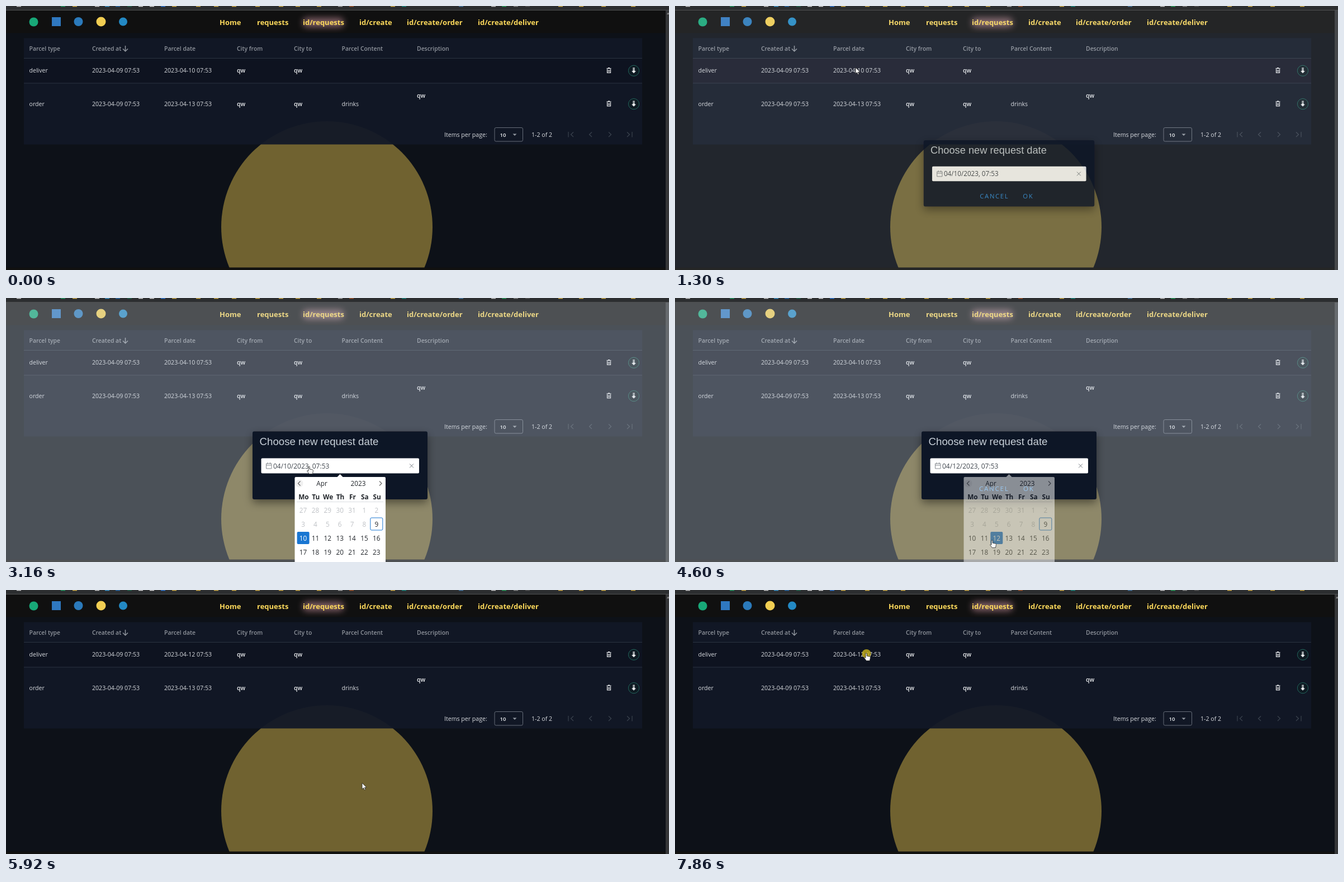
An HTML page that plays this animation: 1186 px wide and 472 px high, repeating every 7990 ms.

```html
<!DOCTYPE html>
<html lang="en">
<head>
<meta charset="utf-8">
<title>Parcel requests</title>
<style>
  html, body { margin: 0; width: 100%; height: 100%; overflow: hidden; background: #0d1117; }
  svg { display: block; width: 100%; height: 100%; }
  text { font: 500 10.6px "Open Sans", "Noto Sans", sans-serif; fill: #d8dbdf; white-space: pre; }
  .nav { font-size: 13px; font-weight: 700; fill: #fcd95b; }
  .head { font-size: 10.4px; font-weight: 600; fill: #90959d; }
  .strong { font-weight: 600; fill: #eceef0; }
  .title { font: 18.7px "Liberation Sans", Arial, sans-serif; fill: #c9d1d9; }
  .field { font-size: 12px; font-weight: 400; fill: #40474f; }
  .button { font-size: 11.6px; letter-spacing: 1.7px; fill: #2d8fe2; }
  .day { font-size: 11.8px; font-weight: 400; fill: #23272c; text-anchor: middle; }
  .past { fill: #bfc2c6; }
  .week { font-weight: 700; }
  .picked { fill: #fff; }
  .line { fill: none; stroke-width: 1.2; }
</style>
</head>
<body>
<svg id="stage" viewBox="0 0 1186 472" preserveAspectRatio="none"></svg>
<script>
const LOOP = 7990;
const OPEN = 1170, CLOSE = 5700, CLOSED = 5880;
const PICK = 4470, SAVE = 5640;

const text = (x, y, str, cls = '', id = '') =>
  `<text x="${x}" y="${y}" class="${cls}" id="${id}">${str}</text>`;
const rect = (x, y, w, h, fill, more = '') =>
  `<rect x="${x}" y="${y}" width="${w}" height="${h}" fill="${fill}" ${more}/>`;
const circle = (x, y, r, fill, more = '') =>
  `<circle cx="${x}" cy="${y}" r="${r}" fill="${fill}" ${more}/>`;
const line = (d, stroke, more = '') =>
  `<path class="line" d="${d}" stroke="${stroke}" ${more}/>`;

function browserEdge() {
  const folders = [123, 301, 344, 376, 408, 450, 492, 522, 560, 692, 992, 1029, 1069, 1122];
  const others = [[23, '#ccc'], [102, '#1f9d61'], [163, '#ccc'], [181, '#3a9bd8'], [200, '#246bb0'],
    [221, '#20684e'], [241, '#ddd'], [261, '#ddd'], [281, '#2f7be0'], [598, '#aaa'], [618, '#a9562a'],
    [712, '#168a80'], [814, '#467aa8'], [872, '#ccc'], [891, '#25a45b'], [912, '#888'], [933, '#555']];
  return rect(0, 0, 1186, 8, '#2c2e30') + rect(0, 7, 1186, 1, '#505152') +
    folders.map(x => rect(x - 4, 0, 8, 1.3, '#d9b348')).join('') +
    others.map(([x, c]) => rect(x - 4, 0, 8, 1.3, c)).join('');
}

function navbar() {
  const links = [[382, 'Home'], [449, 'requests'], [531, 'id/requests'], [632, 'id/create'],
    [717, 'id/create/order'], [844, 'id/create/deliver']];
  return rect(0, 8, 1180, 40.5, '#101010') +
    '<g clip-path="url(#bar)">' +
    rect(531, 21, 73, 17, '#e6a5b4', 'rx="7" opacity=".5" filter="url(#blur)"') + '</g>' +
    circle(49.5, 28.5, 8, '#18a878') + rect(82, 20, 16, 16, '#2f78c0') +
    circle(129.5, 28, 8, '#2b7abb') + circle(170, 28, 8.5, '#f2ce52') + circle(209.5, 28, 7.5, '#2389c4') +
    links.map(([x, s]) => text(x, 33.6, s, 'nav')).join('');
}

const rowIcons = y =>
  `<g transform="translate(1078.5 ${y})">` +
  line('M-3 -2.6V4H3V-2.6M-4 -3.6H4M-1.5 -4.6H1.5M-1 -1V2.5M1 -1V2.5', '#e4e6e8') + '</g>' +
  `<g transform="translate(1123 ${y})">` +
  circle(0, .4, 9.6, '#0e1a22', 'stroke="#22655c" stroke-width="1"') +
  '<path d="M-1.8 -5H1.8V-3.8H-1.8ZM-1.8 -3H1.8V-1.6H-1.8ZM-1.8 -.8H1.8V1H4L0 5L-4 1H-1.8Z" fill="#e8eaec"/></g>';

function table() {
  const heads = [[41.5, 'Parcel type'], [154, 'Created at'], [283, 'Parcel date'], [413, 'City from'],
    [515, 'City to'], [600.5, 'Parcel Content'], [735, 'Description']];
  const row = (y, kind, date, id) =>
    text(41.5, y, kind) + text(154, y, '2023-04-09 07:53') + text(283, y, date, '', id) +
    text(413, y, 'qw', 'strong') + text(515, y, 'qw', 'strong') + rowIcons(y - 4);
  return rect(32, 57.5, 1106, 190, '#111827', 'opacity=".94"') +
    rect(32, 94, 1106, 44, '#0c121d', 'opacity=".55"') +
    rect(32, 94, 1106, 44, '#8b6f8a', 'id="hover"') +
    rect(32, 93, 1106, 1, '#2a3340') + rect(32, 137.5, 1106, 1, '#2a3340') +
    heads.map(([x, s]) => text(x, 80, s, 'head')).join('') +
    line('M213.5 71V80.5M209 76.5L213.5 81L218 76.5', '#90959d', 'style="stroke-width:1.5"') +
    row(119.3, 'deliver', '', 'date') + row(178.8, 'order', '2023-04-13 07:53') +
    text(600.5, 178.8, 'drinks') + text(735, 163.8, 'qw', 'strong') +
    text(784, 233.6, 'Items per page:') +
    rect(874, 217.5, 50.5, 24.5, 'none', 'rx="2.5" stroke="#666d78"') +
    text(883.5, 233.6, '10', 'strong', 'size') +
    '<path d="M906.5 228.5H913.5L910 232Z" fill="#9298a0"/>' +
    text(940, 233.6, '1-2 of 2') +
    line('M1006 225V234.5M1015 225.5L1010.5 229.7L1015 234M1048 225.5L1043.5 229.7L1048 234' +
      'M1078 225.5L1082.5 229.7L1078 234M1111 225.5L1115.5 229.7L1111 234M1120 225V234.5', '#3a424d');
}

function dialog() {
  return rect(441, 238.5, 313, 121.5, '#111827', 'rx="3" filter="url(#shadow)"') +
    text(453.5, 263.4, 'Choose new request date', 'title') +
    rect(456.5, 286.5, 282.5, 27, '#fff', 'rx="2"') +
    line('M465.5 296H475V305H465.5ZM465.5 299H475M468 294V297M472.5 294V297', '#858a90', 'style="stroke-width:1"') +
    text(478, 304.5, '', 'field', 'value') +
    line('M722 296.5L729 303.5M729 296.5L722 303.5', '#777d84', 'style="stroke-width:1"') +
    rect(608.5, 326.5, 48.5, 27.5, '#2388e0', 'id="okHover" rx="2"') +
    text(544, 344.8, 'CANCEL', 'button') + text(623, 344.8, 'OK', 'button');
}

const cellX = i => 531.6 + 21.87 * i;
const cell = (i, row, more) => rect(cellX(i) - 11, 418 + 25 * row, 22, 22, 'none', 'rx="2" ' + more);

function calendar() {
  let out = '<path d="M591.5 321L597.5 315L603.5 321Z" fill="#fff"/>' +
    rect(516.5, 320, 162.5, 160, '#fff', 'rx="2"') + circle(524.5, 331.5, 7, '#f0f0f0') +
    line('M526.5 327.5L522.5 331.5L526.5 335.5M668 327.5L672 331.5L668 335.5', '#666') +
    text(565, 335.8, 'Apr', 'day') + text(630, 335.8, '2023', 'day') +
    rect(520, 364, 155, 1, '#dcdfe3') +
    cell(6, -1, 'stroke="#1976d2"') + '<rect id="pick" y="418" width="22" height="22" rx="2" fill="#1976d2"/>';
  ['Mo', 'Tu', 'We', 'Th', 'Fr', 'Sa', 'Su'].forEach((d, i) => {
    out += text(cellX(i) + .8, 360, d, 'day week');
  });
  for (let n = 0; n < 28; n++) {
    const day = n < 5 ? 27 + n : n - 4;
    out += text(cellX(n % 7), 383.6 + 25 * Math.floor(n / 7), day, 'day' + (n < 13 ? ' past' : ''), 'd' + n);
  }
  return out;
}

document.getElementById('stage').innerHTML = `
  <defs>
    <clipPath id="bar"><rect y="8" width="1186" height="40"/></clipPath>
    <filter id="blur" x="-40%" y="-150%" width="180%" height="400%">
      <feGaussianBlur stdDeviation="6"/>
    </filter>
    <filter id="shadow" x="-20%" y="-30%" width="140%" height="170%">
      <feDropShadow dx="0" dy="6" stdDeviation="8" flood-opacity=".45"/>
    </filter>
  </defs>
  ${rect(0, 0, 1186, 472, '#0d1118')}
  ${circle(574, 395, 189, '#706230')}
  ${rect(0, 467.5, 1180, 5, '#111110')}
  ${navbar()}${table()}
  ${rect(1180, 8, 6, 464, '#353638')}
  <path id="scrollArrow" d="M1182 15L1184.5 11.5L1187 15Z" fill="#8a8a8a"/>
  ${rect(0, 8, 1186, 464, '#cdd7e0', 'id="scrim"')}
  ${browserEdge()}
  <g id="dialog">${dialog()}</g>
  <g id="calendar">${calendar()}</g>
  ${circle(0, 0, 8, '#c9b41a', 'id="press" opacity=".8"')}
  <g id="cursor" stroke="#222" stroke-width=".8" stroke-linejoin="round" fill="#fff">
    <path id="arrow" d="M0 0V11L2.6 8.7L4.4 12.6L6.1 11.8L4.4 8.1H8Z"/>
    <path id="hand" d="M0 1C0 -.5 2.2 -.5 2.2 1V5L7.2 6C8.3 6.3 8.6 7 8.4 8.2L7.4 13.5H1.4L-2.2 8.8C-2.8 7.6 -1.6 7 -.8 7.8L0 8.6Z"/>
  </g>`;

const el = {};
document.querySelectorAll('[id]').forEach(node => { el[node.id] = node; });
el.size.style.fontSize = '9.6px';

// time, x, y of the pointer tip
const path = [
  [70, 955, 388], [400, 620, 230], [630, 286, 72], [830, 323, 110], [1370, 323, 110],
  [1860, 566, 311], [1930, 566, 311], [2290, 541, 301], [3290, 541, 301], [3600, 525, 330],
  [3890, 530, 452], [4130, 565, 434], [4270, 566, 433], [4800, 566, 433], [4880, 576, 427],
  [5140, 671, 380], [5370, 635, 344], [5920, 637, 345], [6400, 900, 332], [6650, 1165, 150],
  [6900, 800, 26], [7250, 361, 104], [7320, 361, 104], [7650, 341, 113], [LOOP, 341, 113]
];

const clamp = v => Math.max(0, Math.min(1, v));
const ramp = (t, from, to) => clamp((t - from) / (to - from));
const within = (t, from, to) => t >= from && t < to;
const show = (node, on) => { node.style.display = on ? '' : 'none'; };

function pointer(t) {
  const i = Math.max(1, path.findIndex(p => p[0] > t));
  const [t0, x0, y0] = path[i - 1], [t1, x1, y1] = path[i];
  const k = ramp(t, t0, t1), s = k * k * (3 - 2 * k);
  return [x0 + (x1 - x0) * s, y0 + (y1 - y0) * s];
}

function render(t) {
  const leaving = ramp(t, CLOSE, CLOSED);
  const enter = 1 - (1 - ramp(t, OPEN, OPEN + 225)) ** 2;
  const open = within(t, OPEN, CLOSED);
  const [x, y] = pointer(t);

  show(el.dialog, open);
  el.dialog.setAttribute('opacity', enter * (1 - leaving ** 2.6));
  const scale = .86 + .14 * enter - .1 * leaving ** 3;
  const shift = t >= CLOSE ? -12.5 : 0;
  el.dialog.setAttribute('transform',
    `translate(${597.5 + shift} 299.2) scale(${scale}) translate(-597.5 -299.2)`);
  el.scrim.setAttribute('opacity', .32 * ramp(t, OPEN, OPEN + 400) * (1 - leaving ** 4));
  show(el.scrollArrow, !within(t, OPEN, CLOSE));

  const picked = t >= PICK;
  el.value.textContent = `04/${picked ? 12 : 10}/2023, 07:53`;
  el.date.textContent = `2023-04-${t >= SAVE ? 12 : 10} 07:53`;
  el.pick.setAttribute('x', cellX(picked ? 2 : 0) - 11);
  el.d14.classList.toggle('picked', !picked);
  el.d16.classList.toggle('picked', picked);
  const fade = ramp(t, 2560, 2760) * (1 - ramp(t, PICK, 4740));
  show(el.calendar, fade > 0);
  el.calendar.setAttribute('opacity', fade);

  const overOk = within(t, 4880, CLOSED) && x > 608 && x < 657 && y > 326 && y < 354;
  el.okHover.setAttribute('opacity', overOk ? .3 : 0);
  const overRow = t > 70 && t < 1400 && y > 94 && y < 138;
  el.hover.setAttribute('opacity', overRow ? .06 : 0);

  const overDate = !open && x > 283 && x < 369 && y > 100 && y < 130;
  const hand = overDate || within(t, 1860, CLOSE + 100);
  show(el.cursor, t >= 70);
  show(el.hand, hand);
  show(el.arrow, !hand);
  el.cursor.setAttribute('transform', `translate(${x} ${y})`);
  show(el.press, within(t, 1100, 1240) || t >= 7720);
  el.press.setAttribute('cx', x + 1.5);
  el.press.setAttribute('cy', y + 1);
}

function tick(now) {
  render(now % LOOP);
  requestAnimationFrame(tick);
}
render(0);
requestAnimationFrame(tick);
</script>
</body>
</html>
```
